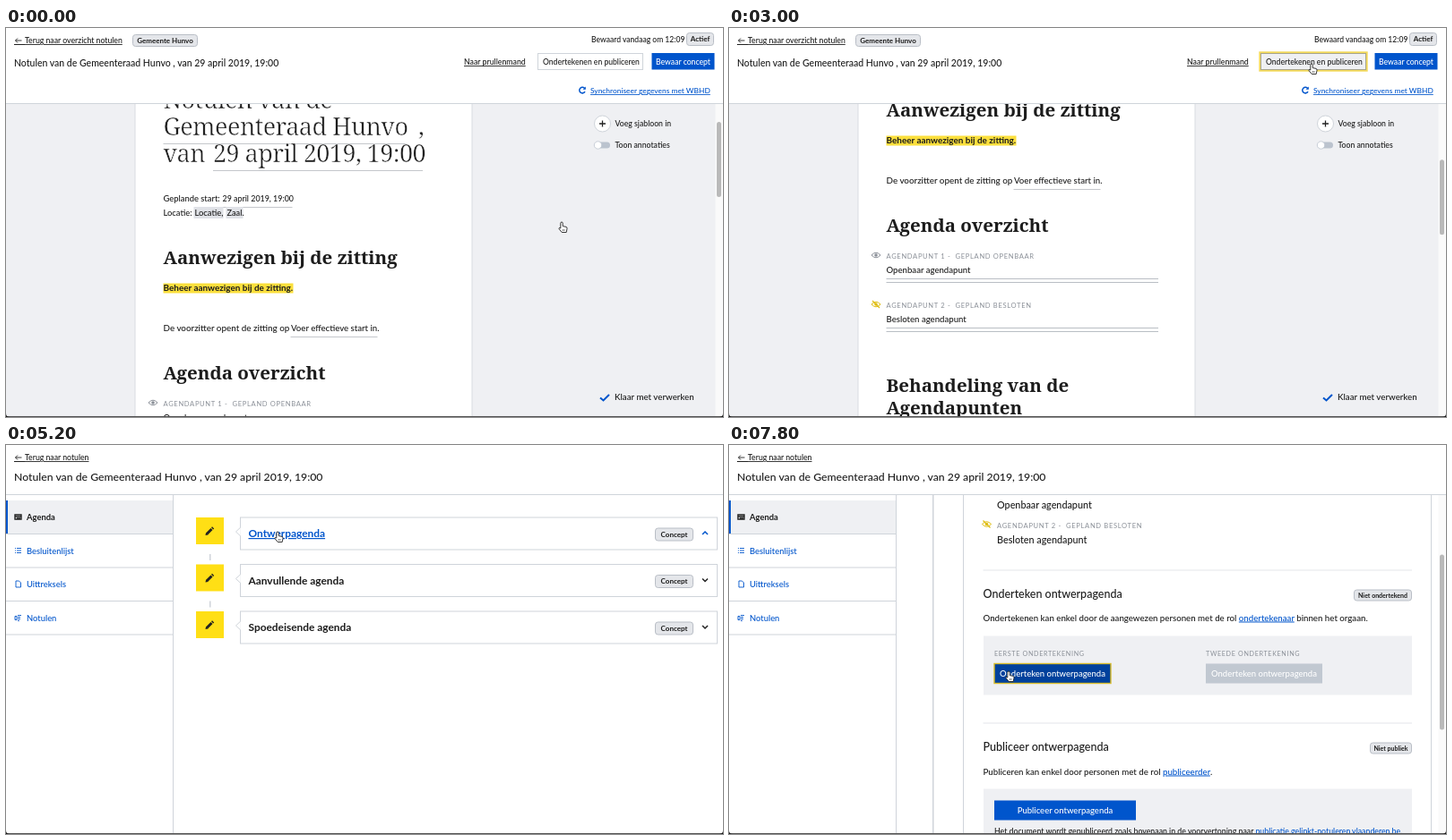
Write an HTML page that moves like this. It is 800x435 px and loops after 8 s.

```html
<!DOCTYPE html>
<html lang="nl">
<head>
<meta charset="utf-8">
<title>Notulen</title>
<style>
  html, body { margin: 0; width: 100%; height: 100%; overflow: hidden; background: #fff; }
  svg { display: block; }
  text { white-space: pre; }
  #stage { width: 100%; height: 100%; font-family: Lato, sans-serif; font-weight: 500; fill: #1c1c1c; }
  .b { font-weight: 700; }
  .u { text-decoration: underline; }
  .link { fill: #0055cc; text-decoration: underline; }
  .blue { fill: #0055cc; }
  .white { fill: #fff; }
  .mid { text-anchor: middle; }
  .caps { fill: #8b9098; letter-spacing: .65px; font-weight: 400; }
  .h1 { font: 300 27px "Noto Serif", serif; letter-spacing: -.55px; stroke: #fff; stroke-width: .6px; }
  .h2 { font: 700 20.5px "Noto Serif", serif; }
  .busy { font: 700 17px "Noto Serif", serif; letter-spacing: -.2px; text-anchor: middle; }
</style>
</head>
<body>
<svg id="stage" viewBox="0 0 800 435"></svg>
<script>
const STEP = 200, LOOP = 8000;
const BLUE = '#0055cc', YELLOW = '#ffdf15', PALE = '#eff0f3', LINE = '#cfd4da';
const TITLE = 'Notulen van de Gemeenteraad Hunvo , van 29 april 2019, 19:00';
const DATE = '29 april 2019, 19:00';

const clamp = v => Math.max(0, Math.min(1, v));
const smooth = v => (v = clamp(v), v * v * (3 - 2 * v));

const box = (x, y, w, h, fill, more = '') =>
  `<rect x="${x}" y="${y}" width="${w}" height="${h}" fill="${fill}" ${more}/>`;
const text = (x, y, str, size = 8.6, cls = '') =>
  `<text x="${x}" y="${y}" font-size="${size}" class="${cls}">${str}</text>`;
const path = (d, stroke, width = 1, fill = 'none') =>
  `<path d="${d}" stroke="${stroke}" stroke-width="${width}" fill="${fill}"/>`;
const at = (x, y, markup) => `<g transform="translate(${x} ${y})">${markup}</g>`;
const fade = (opacity, markup) => `<g opacity="${opacity}">${markup}</g>`;
const below = (top, markup) =>
  `<svg y="${top}" width="800" height="${435 - top}" viewBox="0 ${top} 800 ${435 - top}">${markup}</svg>`;
const rule = (x1, x2, y, color = '#c4c7cb') => box(x1, y, x2 - x1, 1, color);
const border = (color, width = 1) => `stroke="${color}" stroke-width="${width}"`;

const badge = (x, y, w, h, label, size = 8) =>
  box(x + .5, y + .5, w - 1, h - 1, '#e4e6ea', `rx="3" ${border('#b9bec6')}`) +
  text(x + w / 2, y + h / 2 + size * .36, label, size, 'b mid');

const eye = (x, y, hidden) => {
  const color = hidden ? '#dfbd12' : '#8b9098';
  return at(x, y, path('M-5 0Q0 -5.6 5 0Q0 5.6 -5 0Z', color) +
    `<circle r="1.8" fill="${color}"/>` + (hidden ? path('M-4 -4L4 4', color, 1.3) : ''));
};

const chevron = (x, y, up, color) =>
  at(x, y, path(up ? 'M-3 1.5L0 -1.5L3 1.5' : 'M-3 -1.5L0 1.5L3 -1.5', color, 1.5));

const scrollbar = (top, y, h) =>
  box(791.5, top, 8.5, 435 - top, '#fafafa') + box(793, y, 5, h, '#b9b9b9', 'rx="2.5"');

const backLink = label =>
  path('M17.5 14H10.5M13 11.5L10.5 14L13 16.5', '#222', .9) + rule(9, 21, 18, '#222') +
  text(21, 17, label, 8.7, 'u');

const agendaItem = (x, y, n, kind, item, size, gap) =>
  eye(x - 11.5, y - 4, n === 2) +
  text(x, y, `AGENDAPUNT ${n} -  GEPLAND ${kind}`, 7.6, 'caps') +
  text(x, y + gap, item, size);

function editorHeader(pressed) {
  return box(0, 0, 800, 84, '#fff') + rule(0, 800, 84, LINE) +
    backLink('Terug naar overzicht notulen') +
    badge(141, 7, 73, 14, 'Gemeente Hunvo') +
    text(653, 16, 'Bewaard vandaag om 12:09', 8.55) + badge(759, 5, 31, 15, 'Actief') +
    text(9, 43, TITLE, 10.5) +
    text(511, 41, 'Naar prullenmand', 8.75, 'u') +
    (pressed ? box(592.5, 27.5, 119, 20, PALE, border('#f3d95b', 2.4)) : '') +
    box(593.5, 28.5, 117, 18, pressed ? PALE : '#fff', border(pressed ? '#a6a48f' : LINE)) +
    text(599, 41, 'Ondertekenen en publiceren', 8.6) +
    box(720.5, 28, 70, 18.5, BLUE) + text(755.5, 41, 'Bewaar concept', 8.65, 'white mid') +
    at(643, 69.5, path('M2.8 -1.8A3.3 3.3 0 1 0 3 1.6', BLUE, 1.5) + path('M3.8 -4V-.8H.6Z', 'none', 0, BLUE)) +
    text(652, 73, 'Synchroniseer gegevens met WBHD', 8.4, 'link');
}

// Minutes text below the title, in document coordinates.
function minutes(x) {
  return text(x, 265, 'Geplande start:', 9.4) + text(x + 66, 265, DATE, 8.9) + rule(x + 66, x + 144, 271) +
    box(x + 34, 271, 33, 13, '#e0e2e7') + box(x + 70, 271, 19, 13, '#e0e2e7') +
    text(x, 281, 'Locatie:', 9.4) + text(x + 35, 281, 'Locatie,', 9.4) + text(x + 71, 281, 'Zaal.', 9.2) +
    text(x, 335, 'Aanwezigen bij de zitting', 20.5, 'h2') +
    box(x, 356.5, 145, 11, '#fbdf3c') +
    text(x, 365, 'Beheer aanwezigen bij de zitting.', 9.95, 'b') +
    text(x, 410, 'De voorzitter opent de zitting op', 9.85) +
    text(x + 142.5, 410, 'Voer effectieve start in.', 9.65) + rule(x + 142, x + 239, 416) +
    text(x, 464, 'Agenda overzicht', 20.5, 'h2');
}

function editorPaper(scroll, hover) {
  const x = 175.5;
  return at(0, -scroll,
    box(144, 98, 376, 900, '#fff', border('#d9dce1')) +
    text(x, 161, 'Notulen van de', 27, 'h1') +
    text(x, 191, 'Gemeenteraad Hunvo', 27, 'h1') + text(460, 191, ',', 27, 'h1') + rule(x, 446, 200) +
    text(x, 221, 'van', 27, 'h1') + text(231, 221, DATE, 27, 'h1') + rule(231, 465, 230) +
    minutes(x) +
    (hover ? box(x, 538, 303.5, 16, PALE) + box(x, 554, 303.5, 18, '#d5dae0') : '') +
    agendaItem(x, 494, 1, 'OPENBAAR', 'Openbaar agendapunt', 9.6, 16) +
    agendaItem(x, 549, 2, 'BESLOTEN', 'Besloten agendapunt', 9.6, 16) +
    [516, 520, 571, 575].map(y => rule(x, 479, y, '#b9bec4')).join('') +
    text(x, 643, 'Behandeling van de', 20.5, 'h2') + text(x, 668, 'Agendapunten', 20.5, 'h2'));
}

const sideCard = (x, y, w, label, color, opacity) => fade(clamp(opacity),
  box(x, y, w, 20, '#fff') + box(x + w - 4, y, 4, 20, color) + text(x + 8, y + 13, label, 8.8));

function sidePanel(k, hover) {
  return `<circle cx="665.5" cy="107" r="9" fill="#fff" ${border(LINE)}/>` +
    path('M662 107H669M665.5 103.5V110.5', '#222', 1.3) +
    text(679.5, 110, 'Voeg sjabloon in', 8.7) +
    box(657, 127.5, 17, 7, '#bbc3ce', 'rx="3.5"') +
    `<circle cx="660.5" cy="131" r="4.2" fill="#fff" ${border('#bbc3ce', .8)}/>` +
    text(679.5, 134, 'Toon annotaties', 8.7) +
    (hover ? sideCard(520, 209, 125, 'Agendabeheer', '#b9c2cc', (k - 7) / 2) +
      sideCard(520, 290, 68, 'Agendapunt', YELLOW, (k - 7.8) / 2) +
      sideCard(588, 318, 69, 'Titel', YELLOW, (k - 8.6) / 2) : '') +
    path('M663 413.5L666.5 416.5L673 410', BLUE, 2) +
    text(679, 416, 'Klaar met verwerken', 9.75);
}

function editor(k) {
  const scroll = 71 + 165 * smooth(k / 6), hover = k >= 7 && k <= 10;
  return box(0, 85, 800, 350, PALE) +
    below(85, editorPaper(scroll, hover) + sidePanel(k, hover) + scrollbar(85, 87 + scroll * .255, 84)) +
    editorHeader(k >= 13);
}

function saving(k) {
  const x = 212, bar = 150.5 * (k - 15) / 4;
  return box(0, 85, 800, 350, PALE) +
    box(181, 98, 441, 340, '#fff', border('#e3e5e9')) +
    fade(.3, text(x, 161, 'Notulen van de', 27, 'h1') +
      text(x, 191, 'Gemeenteraad Hunvo', 27, 'h1') + text(497, 191, ', van', 27, 'h1') +
      text(x, 221, DATE, 27, 'h1') + minutes(x)) +
    fade(.5, box(181, 98, bar, 337, '#fdeda1')) +
    box(181 + bar, 97.5, 6, 338, YELLOW) +
    [396, 402, 408].map(cx => `<circle cx="${cx}" cy="240.5" r="1.3"/>`).join('') +
    text(401, 280, 'Bezig met opslaan', 17, 'busy') +
    scrollbar(85, 87, 85) + editorHeader(true);
}

function sidebar() {
  const icons = ['M10 78H17V83H10ZM10 80H17M12 82H16', 'M12 78H17M12 80.5H17M12 83H17M10 78H11M10 80.5H11M10 83H11',
    'M11 77H14.5L16.5 79V84H11Z', 'M10 79H12V83H10ZM13 78H17M13 80H16M13 82H16M13 84H15'];
  return box(0, 56, 186, 379, '#fff') + box(186, 56, 1, 379, LINE) +
    box(0, 62, 186, 37, PALE) + box(0, 62, 2, 37, BLUE) +
    ['Agenda', 'Besluitenlijst', 'Uittreksels', 'Notulen'].map((label, i) => at(0, i * 37.5,
      path(icons[i], i ? BLUE : '#222', i ? .9 : 1.4) + rule(0, 186, 99, LINE) +
      text(23, 84, label, 9.4, i ? 'blue' : 'b'))).join('');
}

const pencilTile = y => box(212, y, 31, 30, YELLOW) +
  at(227.5, y + 15, path('M-3.5 3.5L2 -2M2.6 -2.6L3.6 -3.6', '#222', 3) + path('M-5 5L-4.4 2L-2 4.4Z', 'none', 0, '#222'));

function agendaCard(y, w, h, label, open) {
  const right = 261 + w, first = y === 81;
  return pencilTile(y) + box(261.5, y, w - 1, h, '#fff', border(LINE)) +
    path(`M261.8 ${y + 11}L256.5 ${y + 16}L261.8 ${y + 21}`, LINE, 1, '#fff') +
    text(270.5, y + 22, label, 11.9, 'b' + (first ? ' link' : '')) +
    badge(right - 70, y + 11.5, 43, 15, 'Concept') +
    chevron(right - 14, y + 17.5, open, first ? BLUE : '#222');
}

const signButton = (x, w, y, label, fill, more) =>
  box(x, y, w, 22, fill, more) + text(x + w / 2, y + 14.7, label, 9.5, 'white mid');

function agendaDetails(hover) {
  const x = 283.5;
  const link = str => `<tspan class="link">${str}</tspan>`;
  return rule(271, 775, 117, LINE) +
    text(x, 151, 'Voorvertoning ontwerpagenda', 12.5) + badge(688, 142, 74, 13, 'Meest recente versie', 7) +
    agendaItem(299, 177, 1, 'OPENBAAR', 'Openbaar agendapunt', 10.8, 17) +
    agendaItem(299, 216, 2, 'BESLOTEN', 'Besloten agendapunt', 10.8, 17) +
    rule(x, 762, 263, '#e3e6ea') +
    text(x, 294, 'Onderteken ontwerpagenda', 12.5) + badge(697, 285, 65, 13, 'Niet ondertekend', 7) +
    text(x, 320, `Ondertekenen kan enkel door de aangewezen personen met de rol ${link('ondertekenaar')} binnen het orgaan.`, 9.7) +
    box(284, 337, 478, 66, PALE) +
    text(296, 359, 'EERSTE ONDERTEKENING', 7.2, 'caps') + text(532, 359, 'TWEEDE ONDERTEKENING', 7.2, 'caps') +
    signButton(296, 130, 368, 'Onderteken ontwerpagenda', hover ? '#00419c' : BLUE, hover ? border('#d9bd2c', 1.4) : '') +
    signButton(532, 130, 368, 'Onderteken ontwerpagenda', '#c1c8d1') +
    rule(x, 762, 434, '#e3e6ea') +
    text(x, 465, 'Publiceer ontwerpagenda', 12.5) + badge(715, 456, 47, 13, 'Niet publiek', 7) +
    text(x, 492, `Publiceren kan enkel door personen met de rol ${link('publiceerder')}.`, 9.7) +
    box(284, 508, 478, 120, PALE) +
    signButton(296, 158, 521, 'Publiceer ontwerpagenda', BLUE) +
    text(296, 558.5, `Het document wordt gepubliceerd zoals bovenaan in de voorvertoning naar ${link('publicatie.gelinkt-notuleren.vlaanderen.be,')}`, 8.75);
}

function agendaPage(k) {
  const open = k >= 28, scroll = 123.5 * (1 - (1 - clamp((k - 29) / 6)) ** 2);
  const list = open
    ? at(0, -scroll, box(227, 122, 1.5, 600, LINE) +
        agendaCard(81, 523, 700, 'Ontwerpagenda') + agendaDetails(k >= 38)) + scrollbar(56, 57 + scroll * .53, 196)
    : box(227, 122, 1.5, 7, LINE) + box(227, 174.5, 1.5, 7, LINE) +
      agendaCard(81, 533, 36, 'Ontwerpagenda', k >= 26) +
      agendaCard(133.5, 533, 36, 'Aanvullende agenda') + agendaCard(186, 533, 36, 'Spoedeisende agenda');
  return box(0, 0, 800, 435, '#fff') + below(56, list) + sidebar() +
    rule(0, 800, 55, LINE) + backLink('Terug naar notulen') + text(9, 40, TITLE, 12.25);
}

// Pointer stops: step, x, y
const STOPS = [[0, 620, 217], [2, 620, 217], [7, 439, 324], [10, 439, 324], [12, 650, 40], [15, 650, 40],
  [19, 524, 163], [21, 524, 163], [25, 303, 97], [30, 303, 97], [33, 254, 228], [35, 254, 228], [38, 312, 253], [40, 312, 253]];

function pointer(k) {
  const i = STOPS.findIndex((stop, n) => n && k <= stop[0]);
  const [k0, x0, y0] = STOPS[i - 1], [k1, x1, y1] = STOPS[i];
  const u = smooth((k - k0) / (k1 - k0));
  const hand = k <= 10 || (k >= 12 && k <= 15) || (k >= 25 && k <= 30) || k >= 38;
  const shape = hand
    ? path('M-1.2 1.2A1.2 1.2 0 0 1 1.2 1.2V4.6L5 5.4Q6.3 5.8 6 7.4L5.2 11.5H.2L-3 7.6Q-3.2 5.6 -1.2 7Z', '#222', .9, '#fff') +
      path('M1.3 8V10M3 8V10', '#222', .6)
    : path('M0 0V9.2L2.1 7.3L3.6 10.6L5 10L3.6 6.8H6.4Z', '#fff', .6, '#111');
  return at(x0 + (x1 - x0) * u, y0 + (y1 - y0) * u, shape);
}

const windowEdge = box(0, 434, 800, 1, '#555') +
  path('M0 431Q0 435 4 435H0ZM800 431Q800 435 796 435H800Z', 'none', 0, '#111');

const stage = document.getElementById('stage');
let shown = -1;

function draw() {
  const k = Math.floor(performance.now() % LOOP / STEP);
  if (k !== shown) {
    shown = k;
    const page = k < 16 ? editor : k < 22 ? saving : agendaPage;
    stage.innerHTML = page(k) + pointer(k) + windowEdge;
  }
  requestAnimationFrame(draw);
}
draw();
</script>
</body>
</html>
```
